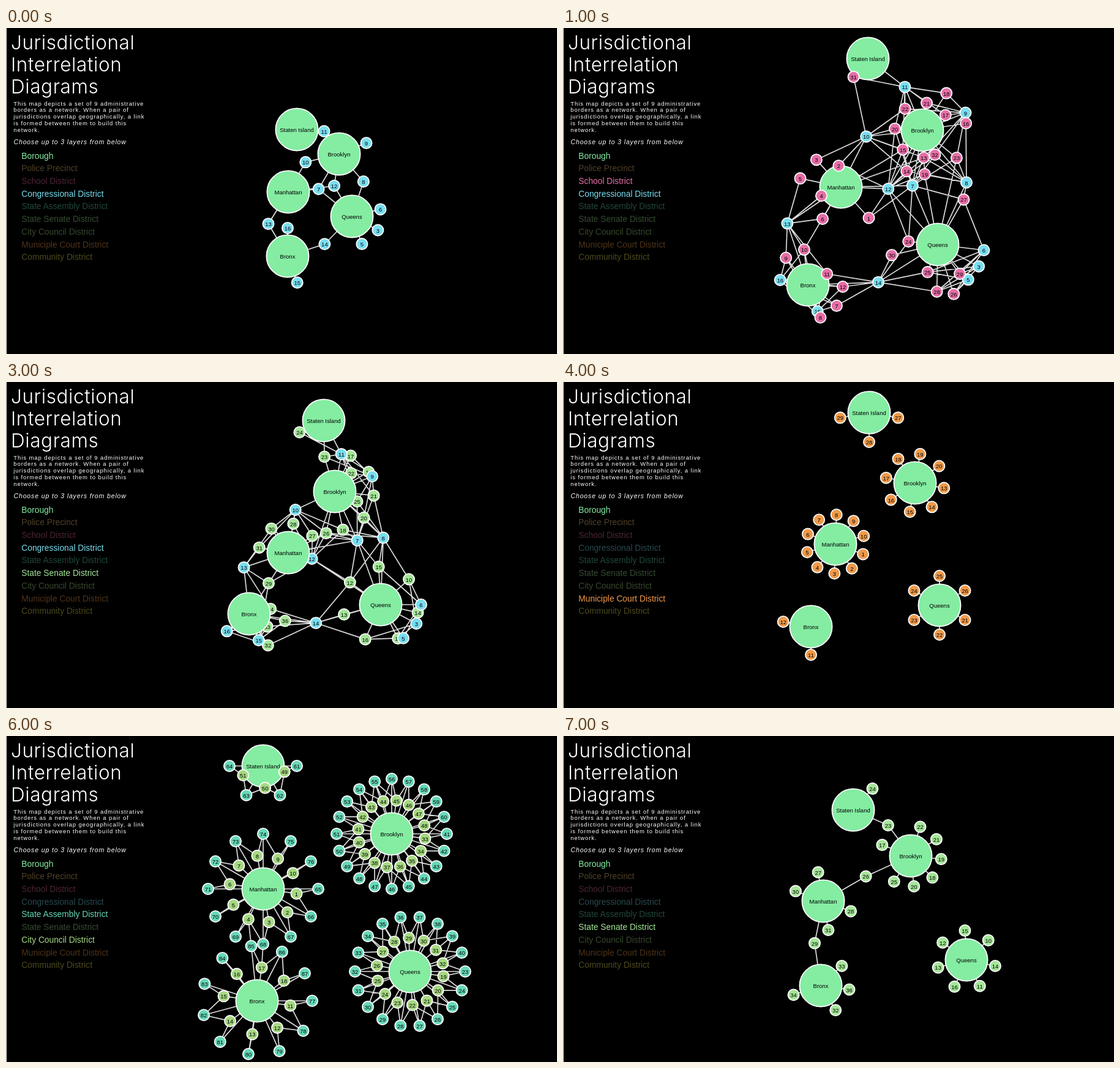
Recreate the animation shown at these times as an HTML page. Size 900 px wide and 533 px high, loop 8000 ms.

```html
<!DOCTYPE html>
<html lang="en">
<head>
<meta charset="utf-8">
<title>Borough overlaps</title>
<style>
html, body { margin: 0; width: 100%; height: 100%; overflow: hidden; background: #000; }
svg { display: block; font-family: "Liberation Sans", Arial, sans-serif; }
.title { font: 300 31.5px Inter, sans-serif; letter-spacing: .6px; }
.intro { font-size: 9.5px; letter-spacing: .91px; }
.hint { font-size: 10.5px; font-style: italic; letter-spacing: .87px; }
.menu { font-size: 13.8px; }
.node { font-size: 9.5px; text-anchor: middle; fill: #000; }
circle { stroke: #fff; stroke-width: 1.8; }
path { stroke: #ddd; stroke-width: 1.7; fill: none; }
</style>
</head>
<body>
<svg id="stage" width="900" height="533" viewBox="0 0 900 533"></svg>
<script>
const LAYERS = {
  b: ['Borough', '#84eda2'],
  p: ['Police Precinct', '#efc376'],
  s: ['School District', '#e66ea6'],
  c: ['Congressional District', '#78def0'],
  a: ['State Assembly District', '#66d8b8'],
  n: ['State Senate District', '#a4e698'],
  u: ['City Council District', '#a6d982'],
  j: ['Municiple Court District', '#f09a4a'],
  m: ['Community District', '#eadd55']
};
const STACKING = 'ncbspaujm';
const BOROUGHS = { SI: 'Staten Island', BK: 'Brooklyn', MN: 'Manhattan', QN: 'Queens', BX: 'Bronx' };
const TOP = 49, BOTTOM = 520;

const range = (from, to) => Array.from({ length: to - from + 1 }, (_, i) => from + i);
const words = list => String(list).split(/[ ,]/);

const scenes = [];
let scene;

function begin(layers, ...hubXY) {
  scene = { layers, nodes: {}, ties: [] };
  scenes.push(scene);
  Object.keys(BOROUGHS).forEach((id, i) => add(id, 'b', BOROUGHS[id], hubXY[2 * i], hubXY[2 * i + 1]));
}
function add(id, key, label, x, y) {
  scene.nodes[id] = { key, label, x, y: Math.min(BOTTOM, Math.max(TOP, y)) };
}
function tie(from, ids) {
  for (const id of words(ids)) scene.ties.push([from, id]);
}

// Districts of one borough, set around it by angle; radii repeat, a dot leaves a slot free.
function ring(key, hub, start, step, radii, labels) {
  const { x, y } = scene.nodes[hub];
  radii = [].concat(radii);
  words(labels).forEach((label, i) => {
    if (label === '.') return;
    const angle = (start + i * step) * Math.PI / 180;
    const r = radii[i % radii.length];
    add(key + label, key, label, x + r * Math.cos(angle), y + r * Math.sin(angle));
    tie(hub, key + label);
  });
}

// Districts shared by boroughs: at their centre, pushed sideways by a growing bend.
function between(key, hubs, bend, step, labels) {
  const ids = words(hubs), ends = ids.map(id => scene.nodes[id]);
  const mean = axis => ends.reduce((sum, e) => sum + e[axis], 0) / ends.length;
  const dx = ends.at(-1).x - ends[0].x, dy = ends.at(-1).y - ends[0].y, length = Math.hypot(dx, dy);
  words(labels).forEach((label, i) => {
    const push = (bend + i * step) / length;
    add(key + label, key, label, mean('x') + dy * push, mean('y') - dx * push);
    ids.forEach(id => tie(id, key + label));
  });
}

// Districts of two layers overlap when they lie near each other.
function weave(keyA, keyB, reach) {
  const all = Object.entries(scene.nodes);
  for (const [idA, a] of all) for (const [idB, b] of all)
    if (a.key === keyA && b.key === keyB && Math.hypot(a.x - b.x, a.y - b.y) < reach) tie(idA, idB);
}

function congress(scale, reach, gap, turn) {
  between('c', 'SI BK', 20, 0, 11);
  between('c', 'BK MN', -22 * scale, 0, 10);
  between('c', 'BK QN', 30 * scale, 0, 8);
  between('c', 'MN BX', -32 * scale, 0, 13);
  between('c', 'BX QN', -15 * scale, 0, 14);
  between('c', 'BK MN QN', -gap, 2 * gap, '12 7');
  ring('c', 'BK', -22, 0, reach, 9);
  ring('c', 'QN', 28 - 42 / scale, 42 / scale, reach, '6 3 5');
  ring('c', 'BX', turn, 70 - turn, 46, '16 15');
}
const senateQueens = radius => ring('n', 'QN', -42, -51, radius, '10 15 12 13 16 11 14');

begin('bc', 475, 166, 544, 206, 461, 268, 565, 308, 460, 373);
congress(1, 48, -13, -90);

begin('bsc', 498, 50, 587, 167, 454, 260, 612, 354, 400, 420);
congress(2, 76, 20, 190);
ring('s', 'SI', 128, 0, 38, 31);
ring('s', 'BK', 87, 24, [45, 72], '13 14 15 . 20 . 22 . 21 18 17 16 . 23 32 19');
ring('s', 'MN', 120, 36, [60, 35, 68], '6 4 5 3 2 . . . 1');
ring('s', 'BX', 231, 33, [57, 58, 57, 36], '9 10 . 11 12 7 8');
ring('s', 'QN', 53, 19, [60, 85, 77, 48], '29 26 28 25 . . 30 24 . . . . . 27');
weave('c', 's', 105);
tie('MN', 's10 s13 s15');
tie('QN', 's19 s23');

begin('bps', 420, 49, 663, 163, 397, 267, 686, 414, 385, 487);
ring('s', 'SI', 180, 0, 33, 31);
ring('s', 'BK', 5, 25.7, [90, 122], '16 23 19 32 14 . 13 15 . 20 21 22 17 18');
ring('s', 'MN', 145, 25, [130, 80], '6 1 3 5 . 2');
ring('s', 'MN', 278, 0, 30, 4);
ring('s', 'BX', 62, 20, 85, '7 12 11 . . 9');
ring('s', 'QN', -30, 25, 104, '27 . 29 26 28 25 24 30');
between('s', 'MN BX', -68, 0, 10);
ring('p', 'SI', 0, 0, [-57, -25, 9, 30], '121 123 120 122');
ring('p', 'BK', 223, 22, 112, '72 66 62 70 61 71 73');
ring('p', 'BK', 212, 30, 80, '78 68 60 63 67 69');
ring('p', 'BK', 5, 45, [36, 60], '77 81 79 88');
ring('p', 'MN', 174, 15, 116, '32 20 22 28 18 9 25');
ring('p', 'MN', 118, 27, 84, '34 33 26 24 5 14 6 19 10');
ring('p', 'MN', 142, 28, 50, '30 . . 7 13 1 17 23');
ring('p', 'BX', 25, 19, 75, '49 41 43 40 44 42 45 48 46');
ring('p', 'BX', 228, 0, 39, 47);
ring('p', 'QN', 2, 23, 98, '105 103 113 107 111 110 . 108 . . . . . 106');
ring('p', 'QN', 0, 30, 55, '101 109 112 102 104 115');
between('p', 'BK MN', -36, 32, '76 84 94');
between('p', 'BK QN', -18, 30, '90 83 100 75');
between('p', 'MN BX', -38, 32, '50 52');
between('p', 'MN BX QN', 0, 0, 114);
weave('s', 'p', 76);
tie('MN', 's13 s15');
tie('QN', 's19 s32');
tie('p114', 's30');

begin('bcn', 519, 63, 537, 179, 461, 279, 612, 364, 397, 379);
congress(1.5, 66, 40, 142);
ring('n', 'SI', 154, 0, 44, 24);
ring('n', 'BK', 276, 18, [40, 64], '. 17 22 19 . 21 25 20 . 18');
ring('n', 'MN', 190, 45, 48, '31 30 28 27');
ring('n', 'BX', -13, 24, [36, 60], '34 36 33 32');
senateQueens(62);
between('n', 'SI BK', -8, 0, 23);
between('n', 'BK MN', 30, 0, 26);
between('n', 'MN BX', 0, 0, 29);
weave('c', 'n', 95);

begin('bj', 500, 50, 575, 165, 445, 265, 615, 365, 405, 400);
ring('j', 'MN', 20, 36, 48, range(1, 10));
ring('j', 'BX', 90, 100, 46, range(11, 12));
ring('j', 'BK', 10, 45, 48, range(13, 20));
ring('j', 'QN', 30, 60, 48, range(21, 26));
ring('j', 'SI', 10, 80, 48, range(27, 29));

begin('bm', 380, 52, 616, 150, 451, 249, 653, 381, 417, 434);
ring('m', 'SI', 183, -20, [34, 48], '502 595');
ring('m', 'SI', -3, 0, [42, 14], '501 503');
ring('m', 'BK', -11, 30, 57, '356 318 303 305 304 308 307 311 313 314 355 317');
ring('m', 'BK', 211, 50, 38, '310 315 309 316 312');
ring('m', 'MN', 276, 22.5, [46, 58], '102 105 . 103 . . 106 101 104 111 109 112 110 164 107 108');
ring('m', 'BX', -10, 23.5, 50, '202 201 203 204 210 209 211 228 212 206 227 226 205');
ring('m', 'QN', 280, 27.7, 57, '410 484 483 481 482 409 480 408 407 405 403 402 413');
ring('m', 'QN', -45, 48, 38, '414 412 411 406 404');
between('m', 'BK MN', -32, 30, '306 302 301');
between('m', 'MN BX', -30, 36, '208 207');
between('m', 'BX QN', 0, 0, 401);

begin('bau', 420, 49, 630, 160, 420, 250, 660, 385, 410, 433);
ring('a', 'QN', 0, 20, 90, range(23, 40));
ring('a', 'BK', 0, 18, 90, range(41, 60));
ring('a', 'SI', 0, 60, 55, range(61, 64));
ring('a', 'MN', 0, 30, 90, range(65, 76));
ring('a', 'BX', 0, 33, 90, range(77, 87));
ring('u', 'MN', 8, 36, 55, range(1, 10));
ring('u', 'BX', 8, 45, 55, range(11, 18));
ring('u', 'QN', 8, 26, 55, range(19, 32));
ring('u', 'BK', 8, 22.5, 55, range(33, 48));
ring('u', 'SI', 15, 70, 36, range(49, 51));
weave('a', 'u', 48);

begin('bn', 474, 121, 568, 196, 425, 270, 659, 366, 421, 408);
ring('n', 'SI', -48, 0, 47, 24);
ring('n', 'BK', -72, 39, 50, '22 21 19 18 20 25 . 17');
ring('n', 'MN', -100, 60, 48, '27 . 28 31 . 30');
ring('n', 'BX', -43, 51, 47, '33 36 32 . 34');
senateQueens(48);
between('n', 'SI BK', 16, 0, 23);
between('n', 'BK MN', -4, 0, 26);
between('n', 'MN BX', -12, 0, 29);

const lines = (cls, x, y, pitch, list) =>
  list.map((t, i) => `<text class="${cls}" fill="#fff" x="${x}" y="${y + i * pitch}">${t}</text>`).join('');

function drawScene({ layers, nodes, ties }) {
  const menu = Object.entries(LAYERS).map(([key, [name, color]], i) =>
    `<text class="menu" x="25.3" y="${213.6 + i * 20.72}" fill="${color}" opacity="${layers.includes(key) ? 1 : .33}">${name}</text>`);
  const links = ties.map(([a, b]) => `M${nodes[a].x} ${nodes[a].y}L${nodes[b].x} ${nodes[b].y}`);
  const depth = node => STACKING.indexOf(node.key);
  const dots = Object.values(nodes).sort((a, b) => depth(a) - depth(b)).map(({ key, label, x, y }) =>
    `<circle cx="${x}" cy="${y}" r="${key === 'b' ? 34.6 : 9.1}" fill="${LAYERS[key][1]}"/>` +
    `<text class="node" x="${x}" y="${y + 4}">${label}</text>`);
  return `<g visibility="hidden">${menu.join('')}<path d="${links.join('')}"/>${dots.join('')}</g>`;
}

const stage = document.getElementById('stage');
stage.innerHTML = '<rect width="900" height="533"/><rect width="1" height="533" fill="#eee"/>' +
  lines('title', 8, 35, 36, ['Jurisdictional', 'Interrelation', 'Diagrams']) +
  lines('intro', 12.3, 126.5, 10.85, ['This map depicts a set of 9 administrative',
    'borders as a network. When a pair of', 'jurisdictions overlap geographically, a link',
    'is formed between them to build this', 'network.']) +
  lines('hint', 12.5, 190, 0, ['Choose up to 3 layers from below']) +
  scenes.map(drawScene).join('');
const groups = [...stage.querySelectorAll('g')];

function show() {
  const current = Math.floor(performance.now() / 1000) % scenes.length;
  groups.forEach((g, i) => g.setAttribute('visibility', i === current ? 'visible' : 'hidden'));
  requestAnimationFrame(show);
}
show();
</script>
</body>
</html>
```
